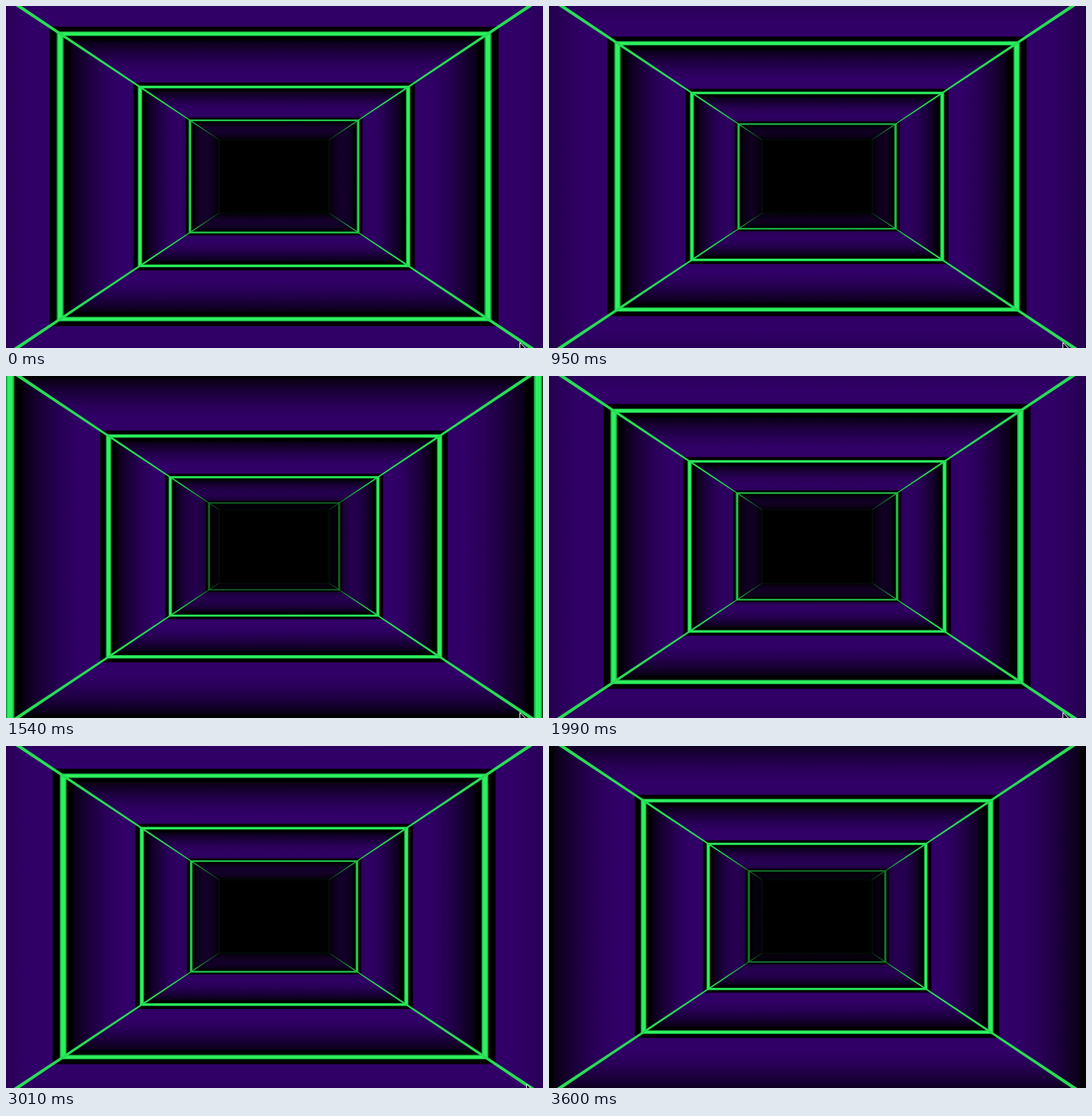
An HTML page with a canvas that plays this animation: 639 by 407 pixels, repeating every 3700 ms.

```html
<!DOCTYPE html>
<html lang="en">
<head>
<meta charset="utf-8">
<title>Neon tunnel</title>
<style>
  html, body { margin: 0; width: 100%; height: 100%; overflow: hidden; background: #000; }
  canvas { display: block; }
</style>
</head>
<body>
<canvas id="stage" width="639" height="407"></canvas>
<script>
const ctx = document.getElementById('stage').getContext('2d');
const LOOP = 3700;
const CENTER = { x: 319, y: 202.8 };
const ASPECT = 0.667;
const RATIO = 1.595;      // size of a ring relative to the next one in
const START_SIZE = 254.5; // half width of a ring at time 0
const BACK_SIZE = 65.5;

const changes = [0, 210, 360, 510, 660, 800, 950, 1090, 1240, 1390, 1540, 1690, 1840,
  1990, 2130, 2280, 2420, 2570, 2710, 2860, 3010, 3160, 3310, 3450, 3600];

// [step, rings travelled]
const travel = [[0, 0], [6, 0.852], [10, 1.451], [13, 1.892], [17, 2.462], [20, 2.97], [24, 3.552]];

const panelStops = [
  [0, '#300066'], [0.73, '#300066'], [0.8, '#290057'], [0.86, '#1e0041'],
  [0.91, '#13002a'], [0.948, '#0a0016'], [0.955, '#000'], [1, '#000']
];
const black = alpha => `rgba(0,0,0,${alpha})`;
const fadeStops = [
  [0, black(1)], [0.52, black(0.95)], [0.56, black(0.8)], [0.62, black(0.58)],
  [0.74, black(0.22)], [0.86, black(0.06)], [1, black(0)]
];

function interpolate(keys, at) {
  const i = Math.max(1, keys.findIndex(key => key[0] >= at));
  const [x0, y0] = keys[i - 1], [x1, y1] = keys[i];
  return y0 + (y1 - y0) * (at - x0) / (x1 - x0);
}

// Runs draw() in a space where the box of this half width spans -1..1.
function inBox(size, draw) {
  ctx.save();
  ctx.translate(CENTER.x, CENTER.y);
  ctx.scale(size, size * ASPECT);
  draw();
  ctx.restore();
}

// Four wedges, each shaded from the centre to its wall.
function shadeWalls(stops) {
  const gradient = ctx.createLinearGradient(0, 0, 1, 0);
  stops.forEach(([at, color]) => gradient.addColorStop(at, color));
  ctx.fillStyle = gradient;
  for (let side = 0; side < 4; side++) {
    ctx.beginPath();
    ctx.moveTo(0, 0);
    ctx.lineTo(1, -1);
    ctx.lineTo(1, 1);
    ctx.fill();
    ctx.rotate(Math.PI / 2);
  }
}

function outline(color, width) {
  ctx.strokeStyle = color;
  ctx.lineWidth = width;
  ctx.strokeRect(-1, -1, 2, 2);
}

function drawSection() {
  ctx.fillStyle = '#000';
  ctx.fillRect(-1.05, -1.05, 2.1, 2.1);
  shadeWalls(panelStops);
  outline('#14963c', 0.033);
  outline('#2cf25e', 0.022);
}

function drawCorners() {
  ctx.save();
  ctx.translate(CENTER.x, CENTER.y);
  ctx.fillStyle = '#29dd56';
  const angle = Math.atan(ASPECT);
  for (const direction of [angle, -angle, Math.PI - angle, Math.PI + angle]) {
    ctx.save();
    ctx.rotate(direction);
    ctx.beginPath();
    ctx.moveTo(0, 0);
    ctx.lineTo(420, -2.2);
    ctx.lineTo(420, 2.2);
    ctx.fill();
    ctx.restore();
  }
  ctx.restore();
}

function drawCursor(step) {
  if (step > 21) return;
  const x = step < 15 ? 611 : step < 18 ? 613 : 619;
  const y = step < 18 ? 400 : 402;
  ctx.beginPath();
  [[0, 0], [0, 16], [4, 12], [11, 11]].forEach(([dx, dy]) => ctx.lineTo(x + dx + 0.5, y + dy + 0.5));
  ctx.closePath();
  ctx.fillStyle = '#000';
  ctx.fill();
  ctx.strokeStyle = '#ddd';
  ctx.lineWidth = 1;
  ctx.stroke();
}

function drawStep(step) {
  ctx.fillStyle = '#000';
  ctx.fillRect(0, 0, 639, 407);
  const phase = interpolate(travel, step) % 1;
  for (let size = START_SIZE * RATIO ** (phase + 2); size > BACK_SIZE; size /= RATIO) {
    inBox(size, drawSection);
  }
  drawCorners();
  inBox(125, () => shadeWalls(fadeStops));
  inBox(BACK_SIZE, () => {
    ctx.fillStyle = '#000';
    ctx.fillRect(-1, -1, 2, 2);
    outline('#03160a', 0.015);
  });
  drawCursor(step);
}

const begin = performance.now();
let shown = -1;
function tick() {
  const time = (performance.now() - begin) % LOOP;
  const step = changes.filter(change => change <= time).length - 1;
  if (step !== shown) drawStep(shown = step);
  requestAnimationFrame(tick);
}
tick();
</script>
</body>
</html>
```
